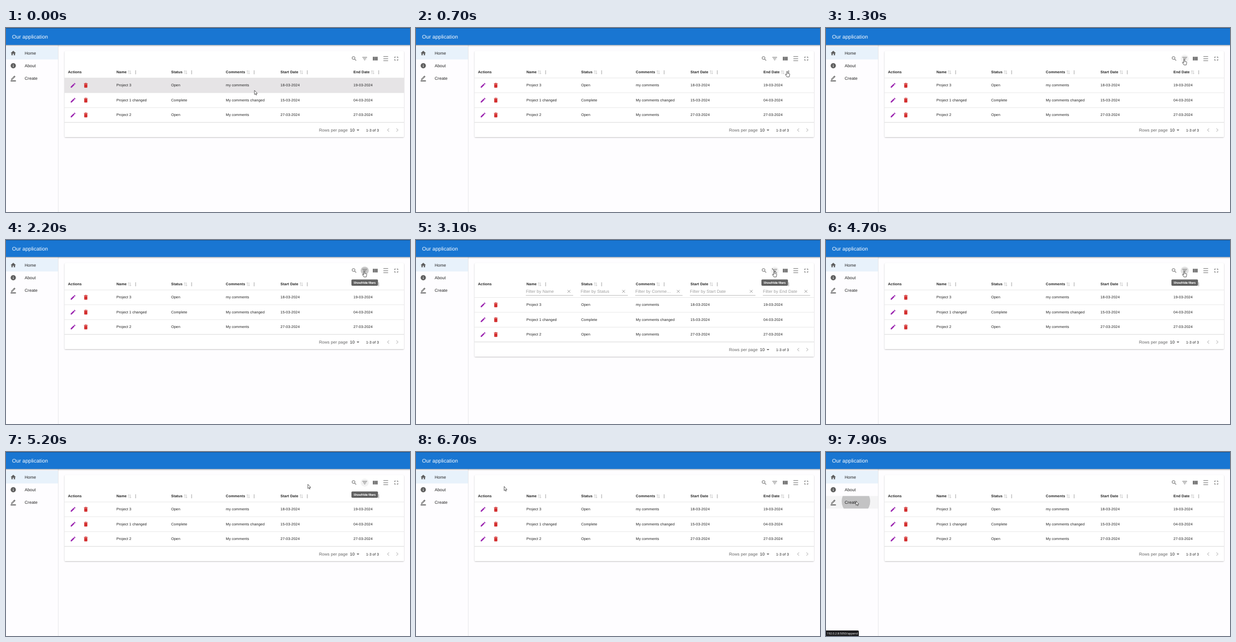
Recreate the animation shown at these times as an HTML page. Size 800x366 px, loop 8000 ms.

```html
<!DOCTYPE html>
<html lang="en">
<head>
<meta charset="utf-8">
<title>Project table</title>
<style>
  html, body { margin: 0; width: 100%; height: 100%; overflow: hidden; background: #fefdff; }
  svg { display: block; font-family: "Liberation Sans", Arial, sans-serif; }
  text { fill: #212121; white-space: pre; letter-spacing: .078px; text-rendering: geometricPrecision; }
  .s { font-size: 7.29px; }
  .b { font-weight: bold; }
  .m { font-size: 8.33px; }
  .title { font-size: 10.42px; fill: #fff; }
  .hint { fill: #9c9c9c; }
  .soft { fill: #666; }
  .tip { font-size: 5.73px; fill: #fff; stroke: #fff; stroke-width: .2px; letter-spacing: .04px; }
  .url { font: 5.7px "Open Sans", "Noto Sans", sans-serif; fill: #fff; letter-spacing: 0; }
  #bar { filter: drop-shadow(0 1px 1.4px rgba(0, 0, 0, .4)); }
  #paper { filter: drop-shadow(0 1px .8px rgba(0, 0, 0, .25)); }
</style>
</head>
<body>
<svg id="stage" width="800" height="366" viewBox="0 0 800 366"></svg>
<script>
const LOOP = 8000, STEP = 100;
const LEFT = 116, WIDTH = 672, PAPER_TOP = 46, PAPER_H = 171;
const ROW_TOP = 99.3, ROW_H = 29.5, FILTER_H = 15;
const ICON_Y = 60.9, ICON_GAP = 20.83, SEARCH_X = 689.5, FILTER_X = SEARCH_X + ICON_GAP;

// Icons on a 24 unit grid
const FILLED = {
  home: 'M10 20v-6h4v6h5v-8h3L12 3 2 12h3v8z',
  info: 'M12 2a10 10 0 1 0 .01 0zM11 7h2v2h-2zM11 11h2v6h-2z',
  columns: 'M3 5h5.3v14H3zM9.3 5h5.4v14H9.3zM15.7 5H21v14h-5.3z',
  edit: 'M3 17.25V21h3.75L17.8 9.9l-3.7-3.7zM15.1 5.2l1.9-1.9q.7-.6 1.4 0l2.3 2.3q.6.7 0 1.4l-1.9 1.9z',
  bin: 'M6 7h12v12q0 2-2 2H8q-2 0-2-2zM5 6V4h3.5l1-1h5l1 1H19v2z',
  dots: 'M12 4a2 2 0 1 0 .01 0zM12 10a2 2 0 1 0 .01 0zM12 16a2 2 0 1 0 .01 0z',
  down: 'M7 10l5 5 5-5z'
};
const LINED = {
  create: 'M5 17v-2.4L16.4 3.2l2.4 2.4L7.4 17zM13.5 6l2.4 2.4M2 21h20M2 23h20',
  search: 'M9.5 4a5.5 5.5 0 1 0 .01 0zM14 14l5.5 5.5',
  filter: 'M3 7h18M6 12h12M10 17h4',
  filterOff: 'M9 7h12M3 7h2M14 12h4M6 12h3M10 17h4M2 3.5l18 18',
  density: 'M3 4h18M3 12h18M3 20h18',
  full: 'M6 10V6h4M14 6h4v4M18 14v4h-4M10 18H6v-4',
  sort: 'M8 21V4M4.5 7L8 3.5 11.5 7M16 3v17M12.5 17l3.5 3.5 3.5-3.5',
  close: 'M6 6l12 12M18 6L6 18',
  left: 'M15 6l-6 6 6 6',
  right: 'M9 6l6 6-6 6'
};

// label and column width
const COLUMNS = [['Name', 108.3], ['Status', 108.3], ['Comments', 108.3], ['Start Date', 144.4], ['End Date', 108.3]];
const ROWS = [
  ['Project 3', 'Open', 'my comments', '18-03-2024', '19-03-2024'],
  ['Project 1 changed', 'Complete', 'My comments changed', '15-03-2024', '04-03-2024'],
  ['Project 2', 'Open', 'My comments', '27-03-2024', '27-03-2024']
];

const ruler = document.createElement('canvas').getContext('2d');
ruler.font = 'bold 72.9px "Liberation Sans", Arial, sans-serif';
let edge = 218.7;
const columns = COLUMNS.map(([label, width]) => {
  const x = edge;
  edge += width;
  return { label, x, sortX: x + ruler.measureText(label).width / 10 + .078 * label.length + 6, end: edge - 15.8 };
});

function icon(name, cx, cy, color = '#666', size = 12.5, more = '') {
  const paint = FILLED[name]
    ? `fill="${color}" fill-rule="evenodd"`
    : `fill="none" stroke="${color}" stroke-width="2"`;
  return `<path d="${FILLED[name] || LINED[name]}" ${paint} ${more}
    transform="translate(${cx - size / 2} ${cy - size / 2}) scale(${size / 24})"/>`;
}
const text = (cls, x, y, str) => `<text class="${cls}" x="${x}" y="${y}">${str}</text>`;
const rect = (x, y, w, h, fill, more = '') =>
  `<rect x="${x}" y="${y}" width="${w}" height="${h}" fill="${fill}" ${more}/>`;

function sidebar() {
  const items = [['home', 'Home'], ['info', 'About'], ['create', 'Create']];
  return rect(103, 33, .8, 333, '#e2e2e4') +
    rect(0, 37.5, 103, 25, '#e8f2fb') +
    rect(0, 87.5, 103, 25, '#f4f4f5', 'id="createBg"') +
    items.map(([name, label], i) =>
      icon(name, 14.4, 50 + 25 * i, '#606060') + text('m', 37, 53.1 + 25 * i, label)).join('') +
    '<circle id="ripple" cx="59.3" cy="98" fill="#000" fill-opacity=".2" clip-path="url(#createClip)"/>';
}

function toolbar() {
  const names = ['search', 'filter', 'columns', 'density', 'full'];
  return names.map((name, i) =>
    icon(name, SEARCH_X + ICON_GAP * i, ICON_Y, '#666', 12.5, `id="${name}"`)).join('') +
    icon('filterOff', FILTER_X, ICON_Y, '#666', 12.5, 'id="filterOff"');
}

function header() {
  return text('s b', 122.7, 90.3, 'Actions') + columns.map(({ label, x, sortX }) =>
    text('s b', x, 90.3, label) + icon('sort', sortX, 88, '#b9b9b9', 9.4) +
    icon('dots', sortX + 11.8, 88, '#a5a5a5', 10.8, `id="dots ${label}"`)).join('');
}

function filters() {
  return columns.map(({ label, x, end }) =>
    text('m hint', x - 1, 105.2, 'Filter by ' + (label === 'Comments' ? 'Comme…' : label)) +
    icon('close', end - 8.4, 102.2, '#8f8f8f', 11) +
    rect(x - 1.2, 109.8, end - x + 1.2, .7, '#979797')).join('');
}

function tableBody() {
  const rows = ROWS.map((cells, i) => {
    const top = ROW_TOP + ROW_H * i, mid = top + ROW_H / 2;
    return (i ? '' : rect(LEFT, top, WIDTH, ROW_H, '#e6e4e6', 'id="rowHover"')) +
      rect(LEFT, top - .4, WIDTH, .8, '#e2e2e2') +
      icon('edit', 132.8, mid, '#9c27b0') + icon('bin', 158, mid, '#d32f2f') +
      cells.map((cell, c) => text('s', columns[c].x, mid + 2.3, cell)).join('');
  }).join('');
  return rect(LEFT, ROW_TOP, WIDTH, 117.7, '#fff', 'rx="1.5"') + rows +
    rect(LEFT, 187.3, WIDTH, 1, '#d6d6d6') +
    text('m soft', 619.7, 206, 'Rows per page') + text('m', 681, 206, '10') +
    icon('down', 697, 203, '#555') + text('s', 713, 205.6, '1-3 of 3') +
    icon('left', 757, 203, '#b8b8b8') + icon('right', 774.7, 203, '#b8b8b8');
}

document.getElementById('stage').innerHTML = `
  <defs><clipPath id="createClip">${rect(0, 87.5, 103, 25, '#000')}</clipPath></defs>
  ${rect(0, 0, 800, 366, '#fefdff')}
  ${sidebar()}
  <g id="bar">${rect(-5, 0, 810, 33.7, '#1976d2')}</g>
  ${rect(0, 0, 800, 1, '#15538f')}
  ${text('title', 12, 20.9, 'Our application')}
  ${rect(LEFT, PAPER_TOP, WIDTH, PAPER_H, '#fff', 'id="paper" rx="2"')}
  <circle id="glow" cx="${FILTER_X}" cy="${ICON_Y}" r="8"/>
  ${toolbar()}
  ${header()}
  <g id="filters">${filters()}</g>
  <g id="body">${tableBody()}</g>
  <g id="tooltip">${rect(684, 78.5, 52.6, 12.5, '#5c5c5c', 'rx="2" fill-opacity=".96"')}${text('tip', 688.2, 86.8, 'Show/Hide filters')}</g>
  <g id="status"><path d="M0 355H63Q65 355 65 357V366H0Z" fill="#1d1d1f"/>${text('url', 2, 362.5, '192.0.2.8:5050/append')}</g>
  <g id="cursor" fill="#fff" stroke="#222" stroke-width=".75" stroke-linejoin="round">
    <path id="arrow" d="M0 0V8.4L1.9 6.7L3.2 9.5L4.4 8.9L3.2 6.2H5.7Z"/>
    <path id="hand" d="M-.9 .8Q-.9 0 0 0T.9 .8V4.2L4 4.8Q5.2 5.1 5.1 6.3L4 11.2H-.6L-3.6 6.6Q-3.8 5.6 -2.8 5.6L-.9 7Z"/>
  </g>`;

// Pointer moves: start, end, and where each one comes to rest
const REST = { x: 492, y: 124 };
const MOVES = [
  [0, 300, 594, 109],
  [400, 700, 735, 86],
  [700, 1200, FILTER_X - 1, 62.3],
  [5020, 5400, 555, 65],
  [5700, 6200, 343, 76],
  [6400, 6700, 174.5, 68.5],
  [6800, 7500, 59.3, 97.5]
];

const ramp = (t, from, to) => Math.min(1, Math.max(0, (t - from) / (to - from)));
const pulse = (t, in0, in1, out0, out1) => ramp(t, in0, in1) - ramp(t, out0, out1);
const easeOut = p => 1 - (1 - p) ** 2;

function pointer(t) {
  return MOVES.reduce((at, [from, to, x, y]) => {
    const p = easeOut(ramp(t, from, to));
    return { x: at.x + (x - at.x) * p, y: at.y + (y - at.y) * p };
  }, REST);
}

const el = id => document.getElementById(id);
const show = (id, on) => el(id).setAttribute('opacity', +on);
const near = (x, y, cx, cy, r) => Math.hypot(x - cx, y - cy) < r;

function draw(time) {
  const t = Math.floor((time % LOOP) / STEP) * STEP;
  const { x, y } = pointer(t);
  const open = pulse(t, 2900, 3100, 4400, 4700);
  const hover = pulse(t, 900, 1000, 5200, 5400);
  const press = pulse(t, 1800, 2100, 2700, 2800) + pulse(t, 4200, 4300, 4400, 4900);
  const onDots = near(x, y, 738.5, 88, 8);
  const hand = onDots || near(x, y, FILTER_X, ICON_Y, 10);
  const off = t >= 3000 && t < 4500;

  el('cursor').setAttribute('transform', `translate(${x} ${y})`);
  show('hand', hand);
  show('arrow', !hand);
  show('rowHover', x > LEFT && y > ROW_TOP && y < ROW_TOP + ROW_H);
  el('dots End Date').setAttribute('fill', onDots ? '#555' : '#a5a5a5');

  el('glow').setAttribute('fill-opacity', .05 * hover + .17 * press);
  show('filter', !off);
  show('filterOff', off);
  show('tooltip', pulse(t, 1300, 1400, 5200, 5400));

  show('filters', open);
  el('body').setAttribute('transform', `translate(0 ${FILTER_H * open})`);
  el('paper').setAttribute('height', PAPER_H + FILTER_H * open);

  show('createBg', x < 103 && y > 87.5);
  show('status', t >= 7400);
  el('ripple').setAttribute('r', 28.2 * ramp(t, 7700, 7900));
}

const start = performance.now();
function tick() {
  draw(performance.now() - start);
  requestAnimationFrame(tick);
}
tick();
</script>
</body>
</html>
```
